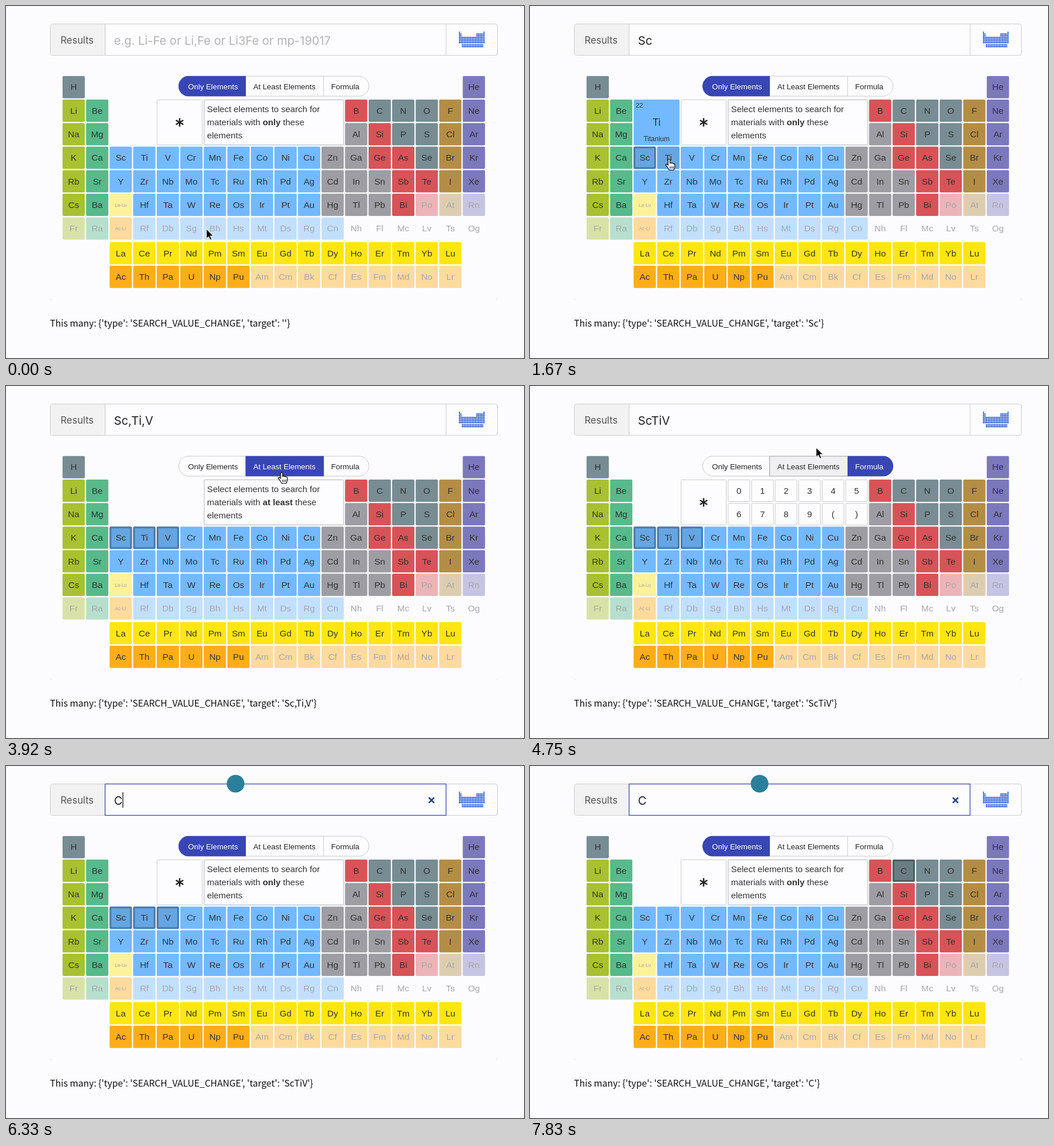
These frames come from a looping animation (907 by 617 pixels, 8010 ms). An HTML page:

```html
<!DOCTYPE html>
<html lang="en">
<head>
<meta charset="utf-8">
<title>Element search</title>
<style>
html, body { margin: 0; width: 100%; height: 100%; overflow: hidden; background: #fcfcff; }
svg { display: block; width: 907px; height: 617px; }
text { font-family: "Liberation Sans", Arial, sans-serif; white-space: pre; fill: #333; }
.mid { text-anchor: middle; }
.ui { font-family: Inter, sans-serif; }
.log { font-family: "Noto Sans CJK JP", "Noto Sans CJK SC", "Noto Sans", sans-serif; fill: #111; }
</style>
</head>
<body>
<svg id="stage" viewBox="0 0 907 617"><g id="base"></g><g id="live"></g></svg>
<script>
const LOOP = 8010, STEP = 250 / 3, PITCH = 41.22, SIZE = 39;

const COLORS = {
  n: '#778c93', k: '#a9c031', e: '#57ba8a', t: '#73b9ff', m: '#9d9da3', d: '#d85357',
  h: '#b48d45', g: '#7b78bc', l: '#ffe610', a: '#ffad18'
};

// row, first column, symbols, kinds (upper case = unavailable)
const GROUPS = [
  [0, 0, 'H', 'n'], [0, 17, 'He', 'g'],
  [1, 0, 'Li Be', 'ke'], [1, 12, 'B C N O F Ne', 'dnnnhg'],
  [2, 0, 'Na Mg', 'ke'], [2, 12, 'Al Si P S Cl Ar', 'mdnnhg'],
  [3, 0, 'K Ca Sc Ti V Cr Mn Fe Co Ni Cu Zn Ga Ge As Se Br Kr', 'ketttttttttmmddnhg'],
  [4, 0, 'Rb Sr Y Zr Nb Mo Tc Ru Rh Pd Ag Cd In Sn Sb Te I Xe', 'ketttttttttmmmddhg'],
  [5, 0, 'Cs Ba La-Lu Hf Ta W Re Os Ir Pt Au Hg Tl Pb Bi Po At Rn', 'keLttttttttmmmdDHG'],
  [6, 0, 'Fr Ra Ac-Lr Rf Db Sg Bh Hs Mt Ds Rg Cn Nh Fl Mc Lv Ts Og', 'KEATTTTTTTTTXXXXXX'],
  [7, 2, 'La Ce Pr Nd Pm Sm Eu Gd Tb Dy Ho Er Tm Yb Lu', 'l'.repeat(15)],
  [8, 2, 'Ac Th Pa U Np Pu Am Cm Bk Cf Es Fm Md No Lr', 'aaaaaaAAAAAAAAA']
];
const NAMES = {
  Sc: [21, 'Scandium'], Ti: [22, 'Titanium'], V: [23, 'Vanadium'],
  Cr: [24, 'Chromium'], Ga: [31, 'Gallium']
};
const TABS = [
  { label: 'Only Elements', x: 302, end: 420, word: 'only' },
  { label: 'At Least Elements', x: 419.5, end: 556.5, word: 'at least' },
  { label: 'Formula', x: 556, end: 636 }
];

const colX = c => 99 + PITCH * c;
const rowY = r => 122.7 + 41.28 * r + (r > 6 ? 2.2 : 0);

const cells = GROUPS.flatMap(([row, col, symbols, kinds]) =>
  symbols.split(' ').map((symbol, i) => ({
    symbol, row, col: col + i, x: colX(col + i), y: rowY(row),
    color: COLORS[kinds[i].toLowerCase()] || 'none',
    on: kinds[i] === kinds[i].toLowerCase()
  })));

const rect = (x, y, w, h, fill, more = '') =>
  `<rect x="${x}" y="${y}" width="${w}" height="${h}" fill="${fill}" ${more}/>`;
const text = (x, y, size, str, more = '') =>
  `<text x="${x}" y="${y}" font-size="${size}" ${more}>${str}</text>`;
const path = (d, more) => `<path d="${d}" ${more}/>`;
const inside = (p, x, y, w, h) => p && p.x >= x && p.x < x + w && p.y >= y && p.y < y + h;
const label = c => {
  const small = c.symbol.length > 2;
  return text(c.x + SIZE / 2, c.y + (small ? 22.5 : 24.7), small ? 8.3 : 15.5, c.symbol, 'class="mid"');
};

function drawBase() {
  let s = rect(0, 0, 907, 617, '#fcfcff');
  s += rect(77.5, 31.5, 783, 55, '#fdfdff', 'rx="4" stroke="#ccc"');
  s += path('M173.500 32H81.500Q78 32 78 35.500V82.500Q78 86 81.500 86H173.500Z', 'fill="#f2f2f3"');
  s += path('M173.5 32V86M770.5 32V86', 'stroke="#ccc"');
  s += text(95.5, 65.8, 16.9, 'Results', 'class="ui" style="fill:#555"');
  for (const c of cells) {
    const y = 45 + c.row * 3 + (c.row > 6 ? 1 : 0);
    s += rect(793 + c.col * 2.53, y, 2.1, 2.4, '#2d62d8');
  }
  s += path('M77.5 512Q77.500 515.500 81 515.500M860.500 512Q860.500 515.500 857 515.500',
    'fill="none" stroke="#e6e6ea"');
  for (const c of cells) {
    s += `<g opacity="${c.on ? 1 : 0.42}">` +
      rect(c.x, c.y, SIZE, SIZE, c.color, 'rx="2"') + label(c) + '</g>';
  }
  return s;
}

// pointer stops: time, x, y
const PATH = [
  [0, 351, 391], [80, 347, 388], [750, 204, 268], [920, 203, 269], [1170, 202, 268],
  [1500, 202, 268], [1667, 244, 269], [2000, 244, 269], [2250, 285, 270], [2420, 288, 266],
  [2667, 441, 200], [3080, 483, 152], [3920, 483, 152], [4000, 528, 152], [4170, 528, 152],
  [4333, 582, 147], [4500, 580, 146], [4583, 545, 141], [4667, 520, 132], [4750, 501, 108],
  [4920, 480, 62], [6750, 480, 62], [7333, 784, 574], [7500, 808, 592], [8010, 808, 592]
];

function pointer(t) {
  if (t < 0 || (t > 6300 && t < 6800) || t > 7550) return null;
  const i = PATH.findIndex(k => k[0] > t);
  const [t0, x0, y0] = PATH[i - 1], [t1, x1, y1] = PATH[i];
  const u = (t - t0) / (t1 - t0), e = u * u * (3 - 2 * u);
  return { x: x0 + (x1 - x0) * e, y: y0 + (y1 - y0) * e };
}

const at = (t, list) => list.reduce((v, [time, next]) => t >= time - 5 ? next : v, '');
const query = t => at(t, [[1330, 'Sc'], [1917, 'Sc-Ti'], [2333, 'Sc-Ti-V'],
  [3333, 'Sc,Ti,V'], [4417, 'ScTiV'], [6330, 'C']]);
const logged = t => at(t, [[1417, 'Sc'], [2000, 'Sc-Ti'], [2417, 'Sc-Ti-V'],
  [3417, 'Sc,Ti,V'], [4500, 'ScTiV'], [6500, 'C']]);
const chosen = t => at(t, [[1330, 'Sc'], [1917, 'Sc Ti'], [2333, 'Sc Ti V'], [6417, 'C']]).split(' ');

function drawSearch(t) {
  const q = query(t), focus = t > 4900;
  let s = '';
  if (focus) s += rect(173.5, 31.5, 597, 55, '#fdfdff', 'stroke="#3a49ae" stroke-width="1.3"');
  if (t > 5325 && t < 6325) s += rect(189, 46, 57, 27, '#b3d7fe');
  s += q ? text(189, 67.6, 20.6, q, 'class="ui" style="fill:#222"')
    : text(189, 67.6, 20.6, 'e.g. Li-Fe or Li,Fe or Li3Fe or mp-19017', 'class="ui" style="fill:#b4b4b6"');
  if (focus && t < 5325) s += rect(246, 46, 1.3, 27, '#111');
  if (t > 6325 && Math.floor((t - 6325) / 500) % 2 === 0) s += rect(204, 46, 1.3, 27, '#111');
  if (t > 4990) s += path('M741 56l8 8m0-8l-8 8', 'stroke="#1d4380" stroke-width="2.5" stroke-linecap="round"');
  if (t > 5325) s += '<circle cx="402" cy="31" r="15.5" fill="#2a809b"/>';
  return s;
}

function drawTabs(mode, near) {
  let s = '<clipPath id="pill"><rect x="302" y="122.500" width="334" height="36" rx="18"/></clipPath>';
  s += rect(302.5, 123, 333, 35, '#fdfdff', 'rx="17.5" stroke="#c8c8cc"');
  s += path('M419.5 123V158M556 123V158', 'stroke="#c8c8cc"');
  TABS.forEach((b, i) => {
    const w = b.end - b.x;
    if (i === mode) s += rect(b.x, 122.5, w, 36, '#3846b3', 'clip-path="url(#pill)"');
    else if (inside(near, b.x, 123, w, 35))
      s += rect(b.x, 123, w, 35, '#f0f0f2', 'stroke="#999" clip-path="url(#pill)"');
    s += text([362.5, 487.5, 594][i], 146, 13.45, b.label,
      `class="mid" style="fill:${i === mode ? '#fff' : '#222'}"`);
  });
  return s;
}

function drawPanel(mode) {
  const edge = 'stroke="#ccc" rx="1"';
  let s = '';
  if (mode !== 1) {
    s += rect(264.5, 164.5, 79, 79, '#fdfdff', edge);
    for (const a of [0, 60, 120])
      s += path('M304 196.500V211.500', `stroke="#222" stroke-width="2.5" transform="rotate(${a} 304 204)"`);
  }
  if (mode === 2) {
    [...'0123456789()'].forEach((ch, i) => {
      const x = colX(6 + i % 6), y = rowY(i < 6 ? 1 : 2);
      s += rect(x + 0.5, y + 0.5, 38, 38, '#fdfdff', edge) + text(x + 19.5, y + 24.7, 15.5, ch, 'class="mid"');
    });
  } else {
    s += rect(347, 164.5, 244, 79, '#fdfdff', 'stroke="#b4b4b8" rx="1"');
    const lines = ['Select elements to search for',
      `materials with <tspan font-weight="bold">${TABS[mode].word}</tspan> these`, 'elements'];
    lines.forEach((line, i) => { s += text(352, 186.3 + 22.8 * i, 15.25, line); });
  }
  return s;
}

function drawCells(picked, hover) {
  let s = '';
  for (const c of cells) {
    const sel = c.on && picked.includes(c.symbol);
    if (!sel && c !== hover) continue;
    s += rect(c.x, c.y, SIZE, SIZE, c.color, 'rx="2"') + rect(c.x, c.y, SIZE, SIZE, '#000', 'rx="2" opacity=".11"');
    if (sel) s += rect(c.x + 1.5, c.y + 1.5, SIZE - 3, SIZE - 3, 'none',
      'rx="1" stroke="#000" stroke-opacity=".27" stroke-width="3"');
    s += label(c);
  }
  const info = hover && NAMES[hover.symbol];
  if (info) {
    s += rect(181.5, 164, 80.3, 80.3, hover.color, 'rx="2"');
    s += text(185, 178, 11.5, info[0]) + text(221.7, 209.5, 17.5, hover.symbol, 'class="mid"');
    s += text(221.7, 237.3, 12, info[1], 'class="mid"');
  }
  return s;
}

function drawPointer(p, kind) {
  const shape = {
    arrow: path('M0 0V16.500L3.800 13L6.500 19.200L9.300 18L6.600 12H12Z', 'fill="#000" stroke="#fff"'),
    hand: path('M-2.2 10V1.2a1.7 1.7 0 0 1 3.4 0V7c0-1.4 3-1.4 3 .3 0-1.2 2.8-1.1 2.8.6 0-1 2.5-1 2.5.9V13' +
      'c0 3-1.500 3.500-1.500 5.500H-.5C-.5 16-5 12.500-6 10c-.8-1.800 1.400-2.600 2.600-.8z',
      'fill="#fff" stroke="#000" stroke-width="1.200"') + path('M1.4 12v4M4 12v4M6.600 12v4', 'stroke="#000"'),
    beam: path('M-3-7.500Q0-7.500 0-5.500Q0-7.500 3-7.500M0-5.500V6M-3 8Q0 8 0 6Q0 8 3 8M-2 1.500H2',
      'fill="none" stroke="#111" stroke-width="1.300"')
  }[kind];
  return `<g transform="translate(${p.x.toFixed(1)} ${p.y.toFixed(1)})">${shape}</g>`;
}

function drawLive(t) {
  const mode = t > 6325 ? 0 : t > 4410 ? 2 : t > 3325 ? 1 : 0;
  const p = pointer(t), live = t > 910;
  const hover = live && cells.find(c => c.on && inside(p, c.x - 1, c.y - 1, PITCH, PITCH));
  const onText = inside(p, 173, 31, 597, 56) || (mode < 2 && inside(p, 347, 164, 244, 79));
  const kind = onText ? 'beam' : hover || inside(p, 302, 123, 334, 35) ? 'hand' : 'arrow';
  return drawSearch(t) + drawTabs(mode, pointer(t - STEP)) + drawPanel(mode) +
    drawCells(chosen(t), hover) +
    text(77, 562, 16, `This many: {'type': 'SEARCH_VALUE_CHANGE', 'target': '${logged(t)}'}`, 'class="log"') +
    (p ? drawPointer(p, kind) : '');
}

const liveLayer = document.getElementById('live');
document.getElementById('base').innerHTML = drawBase();
const start = performance.now();
let last = -1;

function tick() {
  const t = (performance.now() - start) % LOOP;
  const step = Math.min(94, Math.floor((t + 4) / STEP));
  if (step !== last) {
    last = step;
    liveLayer.innerHTML = drawLive(step * STEP);
  }
  requestAnimationFrame(tick);
}
tick();
</script>
</body>
</html>
```
